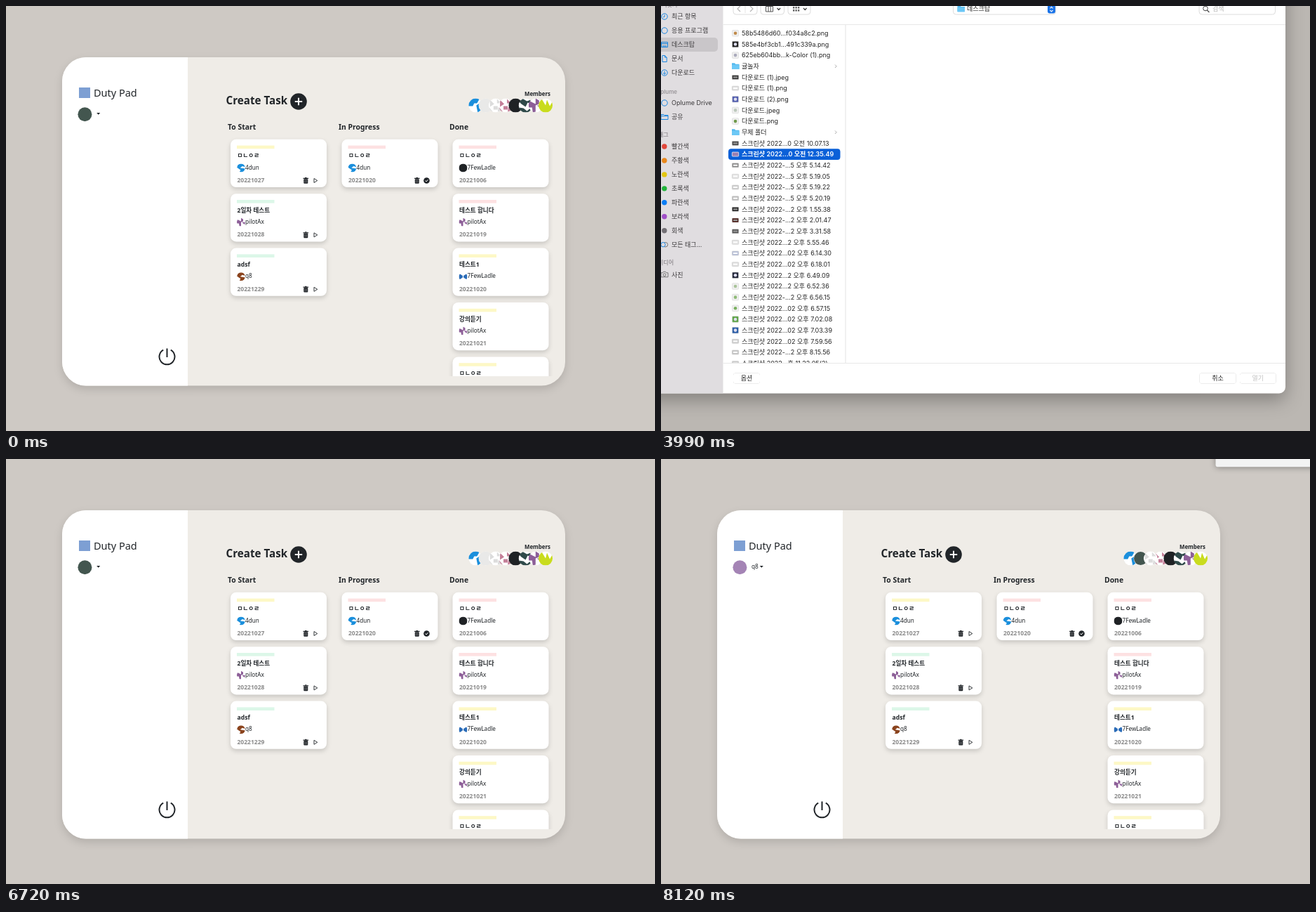
Recreate the animation shown at these times as an HTML page. Size 925 by 605 pixels, loop 9310 ms.

```html
<!DOCTYPE html>
<html lang="ko">
<head>
<meta charset="utf-8">
<style>
  html, body { margin: 0; width: 100%; height: 100%; overflow: hidden; background: #cec9c4; }
  svg { display: block; }
  text { white-space: pre; }
  .web { font-family: "Noto Sans", "Noto Sans CJK KR", "Noto Sans CJK", sans-serif; }
  .mac { font-family: Inter, "Noto Sans CJK KR", "Noto Sans CJK", sans-serif; }
  .panel { filter: drop-shadow(0 5px 6px rgba(0,0,0,.13)); }
  .card { filter: drop-shadow(0 3px 3px rgba(0,0,0,.16)); }
  .sheet { filter: drop-shadow(0 9px 13px rgba(0,0,0,.3)); }
  .popup { filter: drop-shadow(0 1px 4px rgba(0,0,0,.35)); }
  .btn { filter: drop-shadow(0 .5px .7px rgba(0,0,0,.3)); }
  .line { fill: none; stroke: #1a86e0; stroke-width: 1; }
  .idle .line { stroke: #555; }
  .idle .dot { fill: #505050; }
  .idle #place { fill: #c9c0b4; }
</style>
</head>
<body>
<svg id="stage" width="925" height="605" viewBox="0 0 925 605"></svg>
<script>
const LOOP = 9310, STEP = 70, INK = '#212529';

const text = (x, y, size, str, fill = INK, weight = 400, anchor = 'start') =>
  `<text x="${x}" y="${y + size * .36}" font-size="${size}" fill="${fill}" font-weight="${weight}" text-anchor="${anchor}">${str}</text>`;
const rect = (x, y, w, h, fill, r = 0, more = '') =>
  `<rect x="${x}" y="${y}" width="${w}" height="${h}" rx="${r}" fill="${fill}" ${more}/>`;
const disc = (x, y, r, fill, more = '') => `<circle cx="${x}" cy="${y}" r="${r}" fill="${fill}" ${more}/>`;
const path = (d, fill, more = '') => `<path d="${d}" fill="${fill}" ${more}/>`;
const stroke = (d, color, w = 1) => path(d, 'none', `stroke="${color}" stroke-width="${w}"`);
const layer = (id, body, more = '') => `<g id="${id}" ${more}>${body}</g>`;

// Avatars: patterns on a unit disc
const SHAPES = {
  full: 'M-1-1H1V1H-1Z',
  swirl: 'M-1-.1L-.7-1H.6L1-.2 .3-.4-.2 0 1 .2 .6 1H-.4L-.1.5Z',
  wheel: 'M-1-.7L0-.2V.9L-.4 1-.5.3-1 .3ZM0 0V-1L.5-.7V-.2ZM.2 0H1L.9.6Z',
  bow: 'M-1-.8L-.1-.2V.2L-1 .8ZM1-.8L.1-.2V.2L1 .8Z',
  block: 'M-1-.3L-.5-1H.6L.2-.3H-.2L-.4.1H-1ZM.1 0L1-.6V.6L.3 1Z',
  tiles: 'M-.8-.8L-.2-.2-.8.2ZM.2-.9L.8-.3H.2ZM-.3.1H.3V.6H-.3ZM.4.2L.9.7 .3.9ZM-.9.3L-.4.9H-.8Z',
  zig: 'M-1-.6L-.5-1 .2-.6 1-.9V-.1L.3-.4 0 .2-.6-.2ZM-1 .3L-.3.4 .2.8 .9.2 .6 1H-.7Z',
  peak: 'M-1-.3L-.6-1 0 0 .2-.8 .6 .1 1-.6V1H-1Z'
};
const avatar = (x, y, r, color, shape, back = '#fff') =>
  `<g transform="translate(${x} ${y}) scale(${r})" clip-path="url(#unit)">${disc(0, 0, 1, back)}${path(SHAPES[shape], color)}</g>`;

const USERS = {
  blue: ['4dun', '#1b8fdc', 'swirl'],
  bot: ['pilotAx', '#8d5f98', 'wheel'],
  brown: ['q8', '#8a431d', 'swirl'],
  black: ['7FewLadle', '#1f2225', 'full'],
  bow: ['7FewLadle', '#2b6cb8', 'bow']
};
const BARS = { yellow: '#fdf8c6', green: '#dcf7e8', pink: '#fde1e2' };

const trash = (x, y) =>
  rect(x - 3, y - 2.3, 6, 6.6, INK, 1) + rect(x - 3.8, y - 3.7, 7.6, 1.2, INK) + rect(x - 1.3, y - 4.5, 2.6, 1.2, INK) +
  stroke(`M${x - 1.1} ${y - 1}v4M${x + 1.1} ${y - 1}v4`, '#aaa', .6);
const play = (x, y) => stroke(`M${x - 2} ${y - 3}l4.8 3-4.8 3z`, INK, .9);
const check = (x, y) => disc(x, y, 4.3, INK) + stroke(`M${x - 1.9} ${y}l1.4 1.5 2.5-2.8`, '#fff', 1);

function card(x, row, bar, title, user, date, action) {
  const y = 189.8 + row * 77.4, [name, color, shape] = USERS[user];
  let s = rect(x, y, 137, 68.2, '#fff', 8, 'class="card"') + rect(x + 9, y + 8.8, 53.5, 4.6, BARS[bar]) +
    text(x + 9.5, y + 23.6, 8.6, title, INK, 600) + avatar(x + 15, y + 40.6, 6, color, shape) +
    text(x + 21, y + 39.8, 8.2, name) + text(x + 9.5, y + 58, 8.5, date, '#8b8b8b', 600);
  if (action) s += trash(x + 107.3, y + 58.7) + action(x + 121, y + 58.7);
  return s;
}

const MEMBERS = [['#1b8fdc', 'block'], ['#e9e9e8', 'full'], ['#dcdcdc', 'tiles'], ['#c47f98', 'tiles'],
  ['#1f2225', 'full'], ['#2f4a4a', 'zig'], ['#8d5f98', 'wheel'], ['#c9dc1e', 'peak']];
const memberX = i => 669.3 + i * 14.25;

const shell = layer('shell',
  rect(0, 0, 925, 605, '#cec9c4') +
  `<g class="panel">${rect(80, 73, 717, 467.5, '#efece7', 34)}${path('M259 73H114a34 34 0 0 0-34 34V506.5a34 34 0 0 0 34 34H259Z', '#fff')}</g>` +
  rect(104, 116, 16, 15, '#7d9fd3') + text(125, 123.5, 14.5, 'Duty Pad') +
  stroke('M224.2 489.7a11 11 0 1 0 10.6 0M229.5 487.5v12.5', INK, 2) +
  text(313.5, 135, 15.2, 'Create Task', INK, 700) + disc(417, 136, 11.8, INK) + stroke('M411.8 136h10.4M417 130.8v10.4', '#fff', 2) +
  text(776, 124.7, 7.9, 'Members', INK, 700, 'end') +
  [['To Start', 316], ['In Progress', 474], ['Done', 632]].map(([s, x]) => text(x, 172, 10.4, s, INK, 600)).join(''));

const tasks = layer('tasks',
  MEMBERS.map(([c, s], i) => avatar(memberX(i), 141.6, 10, c, s)).join('') +
  layer('joined', disc(memberX(1), 141.6, 9.5, '#43564f') + avatar(memberX(2), 141.6, 10, '#dcdcdc', 'tiles')) +
  '<g clip-path="url(#lists)">' +
  card(320, 0, 'yellow', 'ㅁㄴㅇㄹ', 'blue', '20221027', play) +
  card(320, 1, 'green', '2일차 테스트', 'bot', '20221028', play) +
  card(320, 2, 'green', 'adsf', 'brown', '20221229', play) +
  card(478.5, 0, 'pink', 'ㅁㄴㅇㄹ', 'blue', '20221020', check) +
  card(636.5, 0, 'pink', 'ㅁㄴㅇㄹ', 'black', '20221006') +
  card(636.5, 1, 'pink', '테스트 합니다', 'bot', '20221019') +
  card(636.5, 2, 'yellow', '테스트1', 'bow', '20221020') +
  card(636.5, 3, 'yellow', '강의듣기', 'bot', '20221021') +
  card(636.5, 4, 'yellow', 'ㅁㄴㅇㄹ', 'bot', '20221022') + '</g>');

const caret = x => path(`M${x} 152h5l-2.5 2.7z`, INK);
const profile = layer('before', disc(112.4, 154.3, 10, '#43564f') + caret(129.2)) +
  layer('after', disc(112.4, 154.3, 10, '#a484b5') + text(129, 153.3, 8.2, 'q8') + caret(140.8));

const menu = layer('menu',
  rect(122.5, 165.5, 91, 46, '#fff', 3, 'stroke="#d9d9d9"') + rect(123, 170.8, 90, 17.8, '#f6f7f8', 0, 'id="hover"') +
  text(132, 179, 8.6, '프로필 사진 변경') + text(132, 196.5, 8.6, '로그아웃'));

// File dialog
const shot = s => '스크린샷 2022' + s;
const FILES = ['58b5486d60...f034a8c2.png', '585e4bf3cb1...491c339a.png', '625eb604bb...k-Color (1).png', '귤놀자',
  '다운로드 (1).jpeg', '다운로드 (1).png', '다운로드 (2).png', '다운로드.jpeg', '다운로드.png', '무제 폴더',
  ...['...0 오전 10.07.13', '...0 오전 12.35.49', '-...5 오후 5.14.42', '-...5 오후 5.19.05', '-...5 오후 5.19.22',
    '-...5 오후 5.20.19', '-...2 오후 1.55.38', '-...2 오후 2.01.47', '-...2 오후 3.31.58', '...2 오후 5.55.46',
    '...02 오후 6.14.30', '...02 오후 6.18.01', '...2 오후 6.49.09', '...2 오후 6.52.36', '-...2 오후 6.56.15',
    '...02 오후 6.57.15', '...02 오후 7.02.08', '...02 오후 7.03.39', '...02 오후 7.59.56', '-...2 오후 8.15.56',
    '...후 11.22.05(2)'].map(shot)];
const THUMBS = ['#c08a4a', '#222', '#aab', '', '#333', '#ddd', '#5560b0', '#bcc8bc', '#6f9a4c', '',
  '#444', '#9a7fb0', '#888', '#e2e2e2', '#ccc', '#bbb', '#222', '#4a1d18', '#555', '#e2e2e2',
  '#b8c0d8', '#ddd', '#23283a', '#a9c39a', '#8fba78', '#79b060', '#5fa548', '#2c5fa8', '#ccc', '#c4c4c4', '#ccc'];
const PICKED = 11, rowY = i => 38.8 + i * 15.66;

const folder = (x, y) => path(`M${x - 5} ${y - 4.5}h4l1.2 1.4h5.3v7.4h-10.5z`, '#55b9ee') + rect(x - 5, y - 2, 10.5, 6.3, '#6cc8f6', .8);
function file(name, i) {
  const y = rowY(i), dark = /^#[2-5]/.test(THUMBS[i]);
  const icon = THUMBS[i] === ''
    ? folder(106, y) + stroke(`M248 ${y - 2.2}l2.2 2.2-2.2 2.2`, '#aaa')
    : i < 3 || (i > 5 && i < 9) || (i > 21 && i < 28)
      ? rect(101.5, y - 4.3, 9, 8.6, dark ? THUMBS[i] : '#f0f0f0', 1, 'stroke="#d5d5d5" stroke-width=".6"') + disc(106, y, 2.3, dark ? '#dde' : THUMBS[i])
      : rect(101.3, y - 3, 9.4, 6, THUMBS[i], .8, 'stroke="#ccc" stroke-width=".6"') + rect(103, y - 1, 6, 2, dark ? '#999' : '#fff');
  return icon + text(115, y, 9, name, '#262626');
}
const button = (x, w, label, fill = '#fff', color = '#262626') =>
  rect(x, 522.5, w, 15, fill, 3.5, 'class="btn"') + text(x + w / 2, 530, 9, label, color, 400, 'middle');
const box = (x, w) => rect(x, -9, w, 21, '#fff', 4, 'stroke="#dcdcdc"');

const side = (y, label, icon) => `<g class="line" transform="translate(5 ${y})">${icon}</g>` + text(15, y, 9, label, '#3d3b3d');
const heading = (x, y, s) => text(x, y, 8, s, '#9b979b', 600);
const TAGS = [['빨간색', '#e0463a'], ['주황색', '#e8871b'], ['노란색', '#e3c60f'], ['초록색', '#22b43c'],
  ['파란색', '#0a7df5'], ['보라색', '#a04fc8'], ['회색', '#737075']];
const ring = '<circle r="4.2"/>';

const sidebar = path('M0-20H88.5V551.5H0Z', '#e0dde0') +
  rect(-6, 45, 87, 20, '#c9c6c9', 5, 'id="place"') +
  heading(-6, -1.5, '즐겨찾기') +
  side(15, '최근 항목', ring + '<path d="M0-2.5V.3L-2 1"/>') + side(35, '응용 프로그램', ring) +
  side(55, '데스크탑', '<path d="M-4.5-3.5h9v7h-9zM-4.5-1.5h9M-3 2h6"/>') +
  side(75, '문서', '<path d="M-3-4.5h3.5l2.7 2.7v6.3H-3zM.5-4.5v2.7h2.7"/>') +
  side(95, '다운로드', ring + '<path d="M0-2.3V2.2M-2 .4L0 2.3 2 .4"/>') +
  heading(-7, 122, 'Oplume') + side(138, 'Oplume Drive', ring) +
  side(157.5, '공유', '<path d="M-5-3h4l1 1h5v6H-5zM-5-.8H5"/>') +
  heading(-4, 183.5, '태그') +
  TAGS.map(([s, c], i) => disc(4.8, 200 + i * 19.95, 3.7, c, 'class="dot"') + text(15, 200 + i * 19.95, 9, s, '#3d3b3d')).join('') +
  side(339.7, '모든 태그...', '<circle cx="-2" r="3.2"/><path d="M0-3.2h1.5a3.2 3.2 0 0 1 0 6.4H0" stroke="#777"/>') +
  heading(-4, 365.5, '미디어') +
  side(382.3, '사진', '<path d="M-5-2.5h2.5l1-1.5h3l1 1.5H5v6H-5z" stroke="#777"/><circle cy=".4" r="1.9" stroke="#777"/>');

const toolbar = box(103, 34) + box(142, 33.5) + box(181, 32) + box(416.5, 146) + box(767, 108.5) +
  stroke('M120 -7v17', '#e4e4e4') + stroke('M113 0l-4 4 4 4M127 0l4 4-4 4', '#b5b5b5', 1.2) +
  stroke('M149.500.5h10v7.500h-10zM153 .5v7.500M156.300.5v7.500', '#555') + stroke('M165.500 3l2.300 2.500 2.300-2.500M203 3l2.300 2.500 2.300-2.500', '#444', 1.2) +
  [0, 1, 2, 3, 4, 5].map(i => rect(188 + i % 3 * 3.5, 1 + (i / 3 | 0) * 4, 2.3, 2.6, '#666')).join('') +
  folder(427.5, 4) + text(436, 4, 9, '데스크탑', '#262626') + rect(551, -1.500, 11, 12, '#1a73e8', 3) +
  stroke('M554.500 3.300l2-2 2 2M554.500 6l2 2 2-2', '#fff', 1.1) +
  '<circle cx="776" cy="3.500" r="3.300" fill="none" stroke="#444"/>' + stroke('M778.400 6l3 3', '#444', 1.2) + text(786, 4, 9, '검색', '#b4b4b4');

const day = '2022년 11월 10일 목요일 오전 12:36';
const details = layer('details',
  text(377, 326.7, 10, shot('-11-10 오전 12.35.49'), '#262626', 600) + text(377, 341.2, 8.8, 'PNG 이미지 - 604KB', '#7d7d7d') +
  text(377, 358, 8.800, '정보', '#262626', 600) + text(775, 358.700, 7.600, '자세히 보기', '#1a73e8', 400, 'end') +
  [['생성일', day], ['수정일', day], ['최근 사용일', day], ['크기', '814×496']].map(([k, v], i) => {
    const y = 374.500 + i * 16.400;
    return text(377, y, 7.500, k, '#7d7d7d') + text(775, y, 7.500, v, '#262626', 400, 'end') + (i < 3 ? rect(377, y + 8, 398, .5, '#dedede') : '');
  }).join('') +
  text(377, 445.500, 8.800, '태그', '#262626', 600) + text(377, 462, 8.500, '태그 추가...', '#b8b8b8') +
  button(825, 51.500, '열기', '#1a7ce8', '#fff'));

const dialog = layer('dialog',
  rect(-30, -40, 920, 591.500, '#fff', 9, 'class="sheet"') +
  `<g clip-path="url(#sheet)">${sidebar}</g>` + toolbar +
  rect(88.500, 26, 801.500, 1, '#e8e8e8') + rect(88.500, 508, 801.500, 1, '#e8e8e8') + rect(262.500, 27, 1, 481, '#e4e4e4') +
  `<g clip-path="url(#files)">${FILES.map(file).join('')}</g>` +
  layer('picked', rect(96, rowY(PICKED) - 7.700, 159.500, 15.600, '#0a60d8', 4) + rect(101.300, rowY(PICKED) - 3, 9.400, 6, '#9a7fb0', .8, 'stroke="#fff" stroke-width=".7"') +
    text(115, rowY(PICKED), 9, FILES[PICKED], '#fff', 600)) +
  button(103, 38, '옵션') + button(767.500, 52, '취소') + button(825, 51.500, '열기', '#fff', '#c2c2c2') + details);

document.getElementById('stage').innerHTML =
  `<defs><clipPath id="unit"><circle r="1"/></clipPath>
   <clipPath id="lists"><path d="M300 180H790V527H300Z"/></clipPath>
   <clipPath id="files"><path d="M89 27H263V508H89Z"/></clipPath>
   <clipPath id="sheet"><rect x="-30" y="-40" width="920" height="591.500" rx="9"/></clipPath></defs>
   <g class="web">${shell + profile + tasks + menu}</g>` +
  layer('dim', rect(0, 0, 925, 605, '#000')) + `<g class="mac">${dialog}</g>` +
  layer('blank', rect(0, 0, 925, 605, '#fff')) +
  layer('popup', rect(790.500, -30, 160, 41.300, '#f3f3f3', 3, 'class="popup"'));

const $ = id => document.getElementById(id);
const show = (id, on) => $(id).setAttribute('display', on ? 'inline' : 'none');
const fade = (id, a) => { show(id, a > 0); $(id).setAttribute('opacity', a); };
const within = (t, a, b) => t >= a && t < b;
const smooth = x => { x = Math.max(0, Math.min(1, x)); return x * x * (3 - 2 * x); };

function draw(now) {
  const t = Math.floor(now % LOOP / STEP) * STEP;
  const reloaded = t >= 7140;

  fade('menu', within(t, 1820, 2450) ? 1 : within(t, 2450, 2520) ? .5 : 0);
  show('hover', t >= 2240);

  const rise = smooth((t - 2800) / 210), fall = (t - 5040) / 420;
  const opened = within(t, 2800, 5460);
  fade('dialog', opened ? 1 - smooth(fall) : 0);
  fade('dim', opened ? .09 * (.4 + .6 * rise) * (1 - smooth(fall)) : 0);
  $('dialog').setAttribute('transform', `translate(0 ${-10.6 * (1 - rise + smooth(fall * 2))})`);
  $('dialog').setAttribute('class', t >= 5040 ? 'idle' : '');
  show('picked', t >= 3990);
  show('details', t >= 4060);

  show('blank', within(t, 7140, 7490));
  show('popup', reloaded);
  show('before', t < 7490);
  show('after', t >= 7700);
  show('tasks', !reloaded || t >= 8120);
  show('joined', reloaded);
}
(function tick() {
  draw(performance.now());
  requestAnimationFrame(tick);
})();
</script>
</body>
</html>
```
